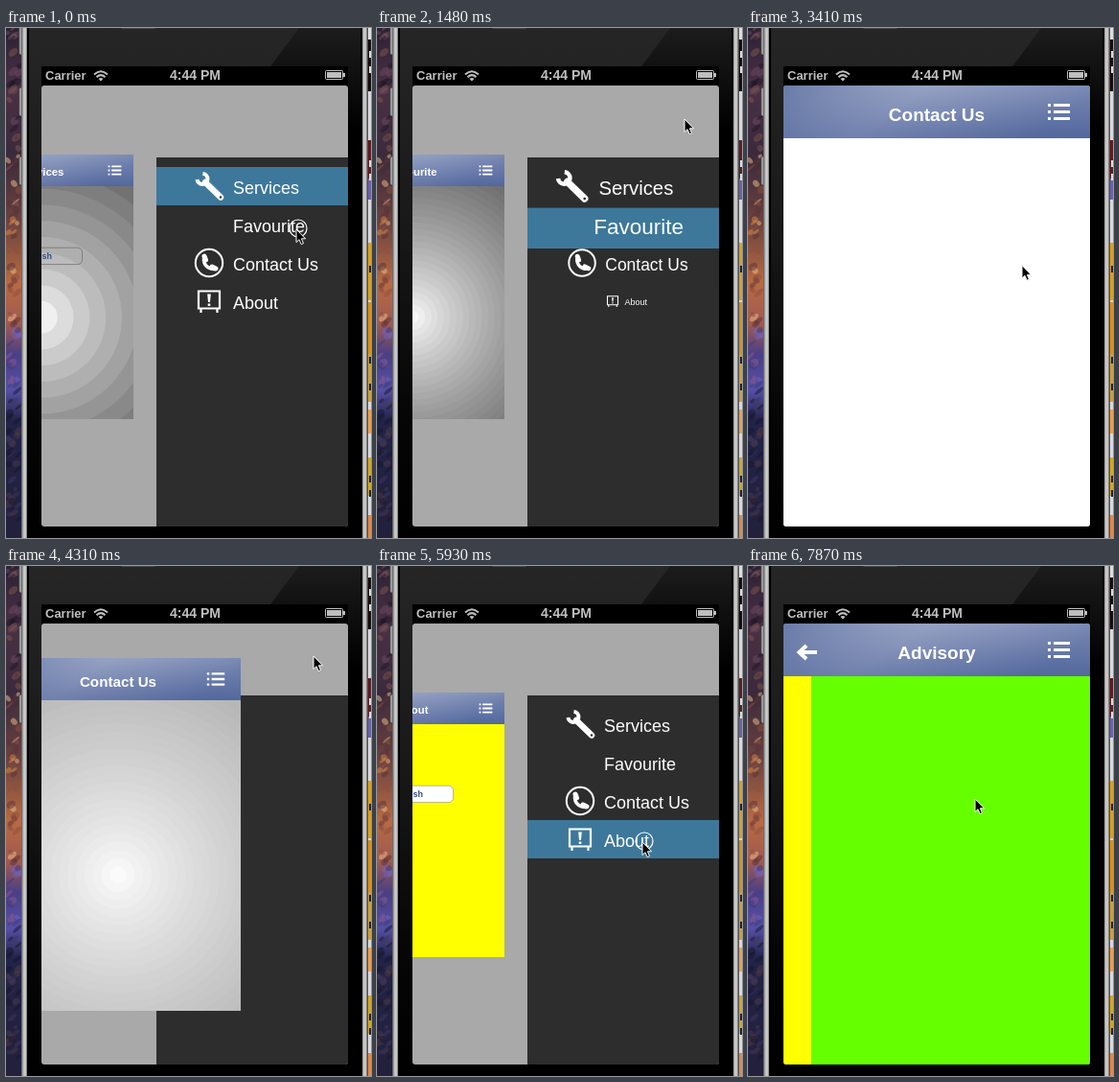
Write an HTML page that moves like this. It is 381 px wide and 532 px high and loops after 8000 ms.

```html
<!DOCTYPE html>
<html lang="en">
<head>
<meta charset="utf-8">
<title>Side menu</title>
<style>
html, body { margin: 0; width: 100%; height: 100%; overflow: hidden; background: #000; }
svg { display: block; font-family: "Liberation Sans", Arial, sans-serif; }
</style>
</head>
<body>
<svg id="stage" width="381" height="532" viewBox="0 0 381 532">
  <defs>
    <linearGradient id="sky" x2="0" y2="1">
      <stop offset="0" stop-color="#2c2236"/><stop offset=".12" stop-color="#4a3044"/>
      <stop offset=".25" stop-color="#3b2a3c"/><stop offset=".38" stop-color="#6b4340"/>
      <stop offset=".5" stop-color="#b86a42"/><stop offset=".58" stop-color="#a05a50"/>
      <stop offset=".64" stop-color="#4a3f86"/><stop offset=".71" stop-color="#5650a4"/>
      <stop offset=".77" stop-color="#222348"/><stop offset="1" stop-color="#23203c"/>
    </linearGradient>
    <linearGradient id="steel">
      <stop offset="0" stop-color="#555"/><stop offset=".3" stop-color="#bbb"/>
      <stop offset=".6" stop-color="#d4d4d4"/><stop offset="1" stop-color="#333"/>
    </linearGradient>
    <linearGradient id="shell" x2="0" y2="1">
      <stop offset="0" stop-color="#262626"/><stop offset=".4" stop-color="#181818"/>
      <stop offset=".75" stop-color="#060606"/><stop offset="1" stop-color="#000"/>
    </linearGradient>
    <linearGradient id="dark" x2="0" y2="1">
      <stop offset="0" stop-color="#1c1c1c"/><stop offset=".2" stop-color="#000"/>
    </linearGradient>
    <linearGradient id="bar" x2="0" y2="1">
      <stop offset="0" stop-color="#8b98bd"/><stop offset="1" stop-color="#566a9e"/>
    </linearGradient>
    <linearGradient id="sheen" x2="1" y2=".25">
      <stop offset="0" stop-color="#41588f" stop-opacity=".45"/>
      <stop offset=".45" stop-color="#b8c0d8" stop-opacity=".25"/>
      <stop offset="1" stop-color="#4c639c" stop-opacity=".3"/>
    </linearGradient>
    <clipPath id="screen"><rect x="37" y="60" width="320" height="460" rx="3"/></clipPath>
    <clipPath id="panelClip"><rect x="157" y="135" width="200" height="385"/></clipPath>
    <clipPath id="body"><rect y="55" width="320" height="405"/></clipPath>
  </defs>

  <g id="desk"><rect width="18" height="532" fill="url(#sky)"/></g>
  <g fill="#999" stroke="#333" stroke-width=".7">
    <rect x="13.5" y="-4" width="5" height="32" rx="2"/>
    <rect x="13.5" y="62" width="5" height="30" rx="2"/>
    <rect x="13.5" y="134" width="5" height="30" rx="2"/>
  </g>
  <rect x="16" width="7" height="532" fill="url(#steel)"/>
  <rect x="371" width="7" height="532" fill="url(#steel)"/>
  <rect x="22" width="350" height="532" fill="#000"/>
  <rect x="24" width="346" height="532" fill="url(#dark)"/>
  <path d="M24 0H306L276 40H37V532H24Z" fill="url(#shell)"/>
  <rect x="120" y="-2" width="36" height="3" rx="1.5" fill="#444"/>

  <rect x="37" y="40" width="320" height="480" fill="#000"/>
  <g fill="#bfbfbf" font-weight="700">
    <text x="41" y="54" font-size="13">Carrier</text>
    <text x="197.500" y="54" font-size="14" text-anchor="middle">4:44 PM</text>
    <g fill="none" stroke="#bfbfbf" stroke-width="2">
      <path d="M92 48.500Q99 42 106 48.500M94.500 51.300Q99 47 103.500 51.300"/>
    </g>
    <path d="M96.500 53Q99 50.800 101.500 53L99 55.500Z"/>
    <rect x="333.500" y="44.500" width="18" height="9" rx="1" fill="none" stroke="#bfbfbf"/>
    <rect x="335" y="46" width="15" height="6"/>
    <rect x="352" y="47" width="2" height="4"/>
  </g>

  <g clip-path="url(#screen)">
    <rect x="37" y="60" width="320" height="460" fill="#a9a9a9"/>
    <rect x="157" y="135" width="200" height="385" fill="#2d2d2d"/>
    <g id="rows" clip-path="url(#panelClip)"></g>
    <g id="page">
      <g clip-path="url(#body)">
        <rect id="paper" y="55" width="320" height="405"/>
        <g id="coarse"></g>
        <g id="fine"></g>
        <g id="button">
          <rect id="plate" x="88" y="162" width="143" height="29" rx="8" stroke-width="1.200"/>
          <text x="160" y="181.500" font-size="15" font-weight="700" fill="#324f85" text-anchor="middle">Push</text>
        </g>
        <rect id="green" y="55" width="320" height="405" fill="#66ff00"/>
      </g>
      <rect width="320" height="55" fill="url(#bar)"/>
      <rect width="320" height="55" fill="url(#sheen)"/>
      <text id="title" x="160" y="37" font-size="19" font-weight="700" fill="#fff" text-anchor="middle"></text>
      <path d="M276 19h3v3h-3zm6 0h17v3h-17zM276 26h3v3h-3zm6 0h17v3h-17zM276 33h3v3h-3zm6 0h17v3h-17z" fill="#fff"/>
      <path id="back" d="M24 23L16.500 30L24 37M17 30H35" fill="none" stroke="#fff" stroke-width="4"/>
    </g>
  </g>

  <g id="cursor">
    <circle id="ring" cx="2" cy="-1" r="9" fill="none" stroke="#fff" stroke-width="1.200"/>
    <path d="M0 0V13.500L3 10.700L5.200 15.600L7.500 14.600L5.400 9.800H9.600Z" fill="#000" stroke="#fff"/>
  </g>
</svg>
<script>
const $ = id => document.getElementById(id);
const NS = "http://www.w3.org/2000/svg";
const LOOP = 8000, STEP = 148.4;
const TITLES = ["Services", "Favourite", "Contact Us", "About", "Advisory"];
const CHANGES = [1, 22, 40, 52];

// Each track is [step, value...], linear in between.
const OPEN = [[0, 1], [2, 0], [7, 0], [9, 1], [21, 1], [23, 0], [28, 0], [30, 1], [40, 1], [42, 0]];
const PUSH = [[51, 320], [52, 190], [53, 29]];
const POINTER = [
  [0, 303, 210], [3, 303, 210], [4, 305, 200], [6, 317, 120], [7, 321, 96], [10, 321, 95], [11, 321, 110],
  [14, 312, 175], [19, 286, 246], [24, 286, 248], [25, 288, 238], [28, 321, 94], [31, 321, 94],
  [32, 314, 152], [36, 277, 288], [45, 277, 288], [48, 237, 243]
];
const POP = [0, .5, .97, 1.25, 1.13, 1, .95, 1];
const ICONS = [
  `<path d="M205.500 -13A5.500 5.500 0 1 1 199.500 -7" fill="none" stroke="#fff" stroke-width="4"/>
   <path d="M208 -4L224 11.500" stroke="#fff" stroke-width="6.500" stroke-linecap="round"/>
   <circle cx="224" cy="11.500" r="1.200" fill="#2d2d2d"/>`,
  "",
  `<circle cx="212" r="14.200" fill="none" stroke="#fff" stroke-width="2"/>
   <path d="M206.500 -5C206 2 211 7 218 6.500" fill="none" stroke="#fff" stroke-width="3.500"/>
   <path d="M207 -7L208.500 -3M215 4L219 6" stroke="#fff" stroke-width="5" stroke-linecap="round"/>`,
  `<path d="M201 -10.500H223V7.500H201ZM203.500 8V12M220.500 8V12" fill="none" stroke="#fff" stroke-width="2.200"/>
   <path d="M210.200 -7.500H213.800L213 1H211ZM210.700 2.500H213.300V5H210.700Z" fill="#fff"/>`
];

function add(parent, tag, attrs) {
  const el = document.createElementNS(NS, tag);
  for (const key in attrs) el.setAttribute(key, attrs[key]);
  parent.appendChild(el);
  return el;
}

function track(keys, n) {
  const j = keys.findIndex(k => k[0] > n);
  if (j < 0) return keys[keys.length - 1].slice(1);
  if (j === 0) return keys[0].slice(1);
  const a = keys[j - 1], b = keys[j], f = (n - a[0]) / (b[0] - a[0]);
  return a.slice(1).map((v, i) => v + (b[i + 1] - v) * f);
}

function drawDesk() {
  let seed = 11;
  const rand = () => (seed = seed * 16807 % 2147483647) / 2147483647;
  const pick = list => list[Math.floor(rand() * list.length)];
  for (let i = 0; i < 110; i++) {
    const y = rand() * 532;
    const tones = y < 130 ? ["#6b4a60", "#1d1828", "#80584c"]
      : y < 310 ? ["#d98a48", "#5a3138", "#f0c08a", "#8c5040"]
      : y < 380 ? ["#6f62c0", "#39397c", "#8c5a8c"]
      : ["#15162c", "#3c3560", "#4d3a44"];
    add($("desk"), "ellipse", {
      cx: rand() * 16, cy: y, rx: 2 + rand() * 4, ry: 1 + rand() * 3, fill: pick(tones),
      opacity: .5, transform: `rotate(-40 8 ${y})`
    });
  }
  add($("desk"), "rect", { x: 377, width: 4, height: 532, fill: "#d8d8dc" });
  const strips = [[0, 12, "#ddd"], [12, 54, "#160c0c"], [117, 40, "#5c1c24"], [157, 22, "#6a62a8"],
    [224, 60, "#d8a020"], [286, 54, "#d89018"], [340, 50, "#c8a040"], [398, 25, "#e8a050"],
    [448, 40, "#d0a828"], [508, 24, "#e08848"]];
  for (const [y, height, fill] of strips) add($("desk"), "rect", { x: 378, y, width: 3, height, fill });
  for (const y of [24, 40, 138, 152, 248, 343, 371, 467, 482])
    add($("desk"), "rect", { x: 379, y, width: 2, height: 7, fill: y < 160 ? "#ddd" : "#222" });
}

function drawBands(group, size) {
  for (let r = Math.ceil(300 / size) * size; r > 0; r -= size) {
    const g = Math.round(255 - 145 * Math.pow((r - size / 2) / 277, .75));
    add(group, "circle", { cx: 160, cy: 283, r, fill: `rgb(${g},${g},${g})` });
  }
}

// Upper rows lie over lower ones.
const rows = [];
for (let i = 3; i >= 0; i--) {
  const g = add($("rows"), "g", {});
  const back = add(g, "rect", { x: 157, y: -20, width: 200, height: 40 });
  const label = add(g, "g", { fill: "#fff", "font-size": 18 });
  label.innerHTML = ICONS[i] + `<text x="237" y="8">${TITLES[i]}</text>`;
  rows[i] = { g, back, label };
}
drawDesk();
drawBands($("coarse"), 28);
drawBands($("fine"), 11);

const show = (el, on) => el.setAttribute("visibility", on ? "visible" : "hidden");
const scaleX = (c, s) => `translate(${c} 0) scale(${s}) translate(${-c} 0)`;

function drawRows(n, selected) {
  const start = n < 8 ? -50 : n < 29 ? 9 : 30;
  const u = (n - start) * 3 + 1;
  rows.forEach((row, i) => {
    const s = POP[Math.max(0, Math.min(POP.length - 1, u - i))];
    show(row.g, s > 0);
    row.g.setAttribute("transform", `translate(0 ${165 + 40 * i})`);
    row.back.setAttribute("transform", scaleX(256.5, s));
    row.back.setAttribute("fill", i === selected ? "#3d789b" : "#2d2d2d");
    row.label.setAttribute("transform", scaleX(280, s));
  });
}

function draw(time) {
  const n = Math.floor((time % LOOP + 13) / STEP);
  const at = CHANGES.filter(c => n >= c).length;
  const [open] = track(OPEN, n);
  const [x, y] = track(POINTER, n);

  drawRows(n, at);
  $("page").setAttribute("transform", `translate(${37 - 96 * open} ${60 + 72 * open}) scale(${1 - .4 * open})`);
  $("title").textContent = TITLES[at];
  $("paper").setAttribute("fill", at >= 3 ? "#ffff00" : "#fff");
  $("coarse").setAttribute("opacity", at === 0 ? open : 0);
  $("fine").setAttribute("opacity", at === 1 || at === 2 ? open : 0);

  const [shift] = track(PUSH, n);
  show($("green"), at === 4);
  show($("back"), at === 4);
  $("green").setAttribute("x", shift);
  show($("button"), at === 0 || at >= 3);
  $("button").setAttribute("transform", `translate(${at === 4 ? shift - 320 : 0} 0)`);
  $("plate").setAttribute("fill", at ? "#fff" : "none");
  $("plate").setAttribute("stroke", at ? "#999" : "#6c6c6c");

  $("cursor").setAttribute("transform", `translate(${x} ${y})`);
  show($("ring"), n === 0 || n === 40);
}

const begin = performance.now();
function tick() {
  draw(performance.now() - begin);
  requestAnimationFrame(tick);
}
tick();
</script>
</body>
</html>
```
